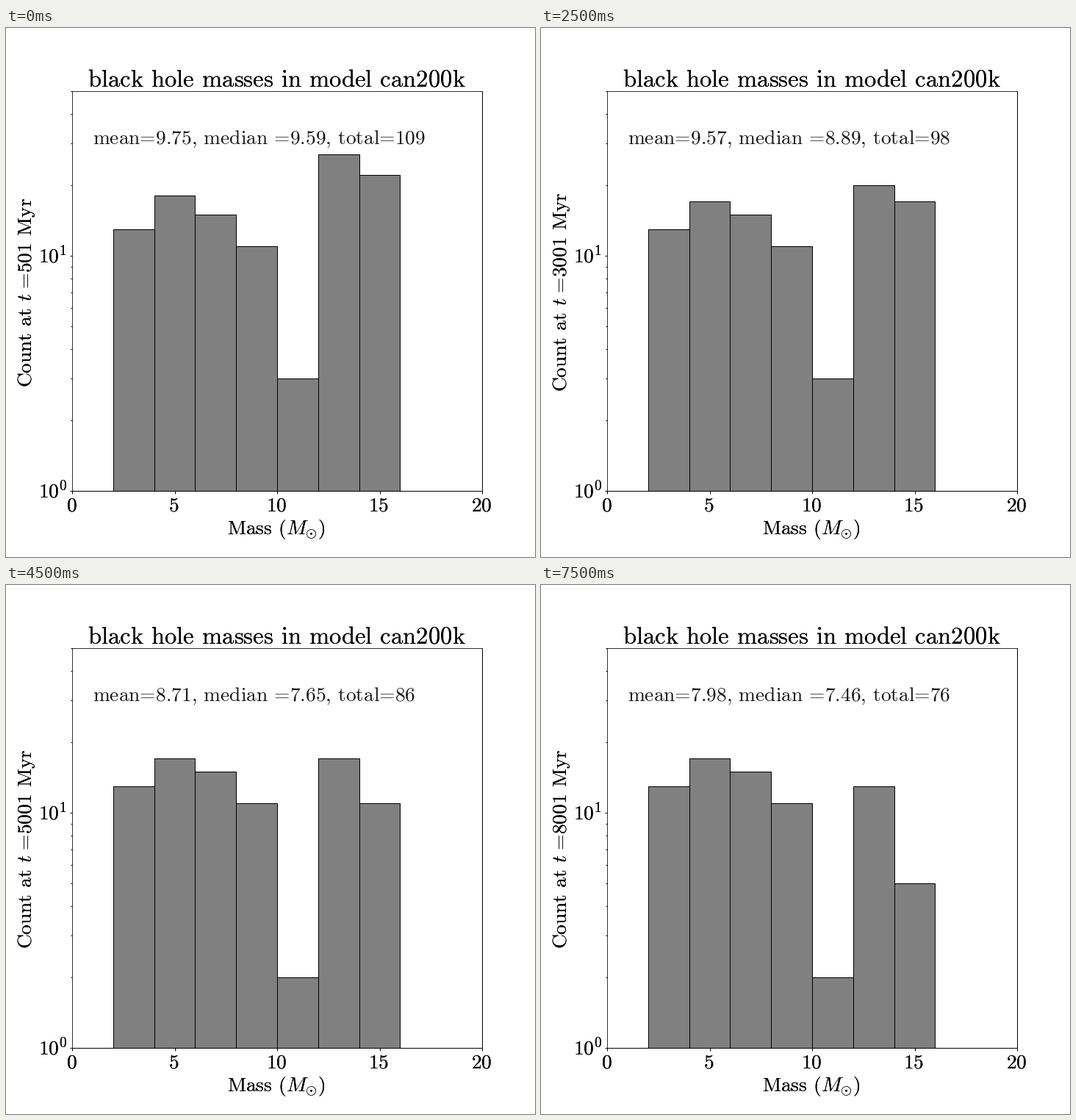
Write a matplotlib script that moves like this. It is 720x720 px and loops after 8000 ms.

```python
import matplotlib.pyplot as plt
import numpy as np
from matplotlib.animation import FuncAnimation
from matplotlib.ticker import NullFormatter

plt.rcParams["mathtext.fontset"] = "cm"

SIZE = 720
STEPS = 16
BODY, TITLE = 27.45, 32.75
SPACE = r"\hspace{0.38}"

# Key points; the values drift linearly between them.
KEYS = [0, 3, 5, 7, 9, 13, 15]
MEAN = [9.75, 9.67, 9.57, 9.19, 8.71, 8.3, 7.98]
MEDIAN = [9.59, 9.52, 8.89, 8.33, 7.65, 7.59, 7.46]
TOTAL = [109, 107, 98, 92, 86, 80, 76]
BIN_12 = [27, 26, 20, 18, 17, 15, 13]
BIN_14 = [22, 21, 17, 14, 11, 7, 5]


def at(i, values, digits=2):
    return round(float(np.interp(i, KEYS, values)), digits)


def count(i, values):
    return int(at(i, values, 0))


def counts(i):
    """The light bins barely change while the heavy ones drain."""
    return [13, 18 - (i > 3), 15, 11, 3 - (i > 7),
            count(i, BIN_12), count(i, BIN_14)]


def words(s):
    """Upright Computer Modern text with normal word spaces."""
    return SPACE.join(r"\text{%s}" % w for w in s.split())


def time_label(i):
    return (words("Count at") + SPACE + r"t\hspace{0.32}"
            + words(f"={501 + 500 * i} Myr"))


def summary(i):
    return words(f"mean={at(i, MEAN)}, median ={at(i, MEDIAN)}, "
                 f"total={count(i, TOTAL)}")


def put(x, y, s, size=BODY, passes=2, **kw):
    """Text at pixel (x, y) from the top left; extra passes darken the edges."""
    kw = {"ha": "center", "va": "baseline", **kw}
    return [fig.text(x / SIZE, 1 - y / SIZE, f"${s}$", fontsize=size, **kw)
            for _ in range(passes)]


fig = plt.figure(figsize=(10, 10), dpi=72, facecolor="white")
ax = fig.add_axes([0.125, 0.125, 0.775, 0.755])
ax.set_yscale("log")
bars = ax.bar(range(2, 16, 2), counts(0), width=2, align="edge",
              color="#808080", edgecolor="black", linewidth=1)
ax.set_xlim(0, 20)
ax.set_ylim(1, 50)
ax.set_xticks(range(0, 21, 5))
ax.tick_params(which="both", width=1)
ax.spines[["right", "bottom"]].set_linewidth(1)
for axis in (ax.xaxis, ax.yaxis):
    axis.set_major_formatter(NullFormatter())
    axis.set_minor_formatter(NullFormatter())

for v in range(0, 21, 5):
    put(89 + 27.9 * v, 657, words(str(v)))
for p in (0, 1):
    put(83, 640 - 320 * p, r"\mathrm{10^{%d}}" % p, ha="right")
put(368, 80, words("black hole masses in model can200k"), TITLE)
put(367.5, 689, words("Mass (") + r"M_{\odot}" + words(")"))
ylabel = put(35.5, 359.5, time_label(0), rotation=90, rotation_mode="anchor")
note = put(117.5, 157.3, summary(0), passes=1, ha="left", color="#181818")


def update(i):
    for bar, c in zip(bars, counts(i)):
        bar.set_height(c)
    for t in ylabel:
        t.set_text(f"${time_label(i)}$")
    note[0].set_text(f"${summary(i)}$")
    return [*bars, *ylabel, *note]


anim = FuncAnimation(fig, update, frames=STEPS, interval=500,
                     repeat=True, repeat_delay=0, blit=False)
plt.show()
```
